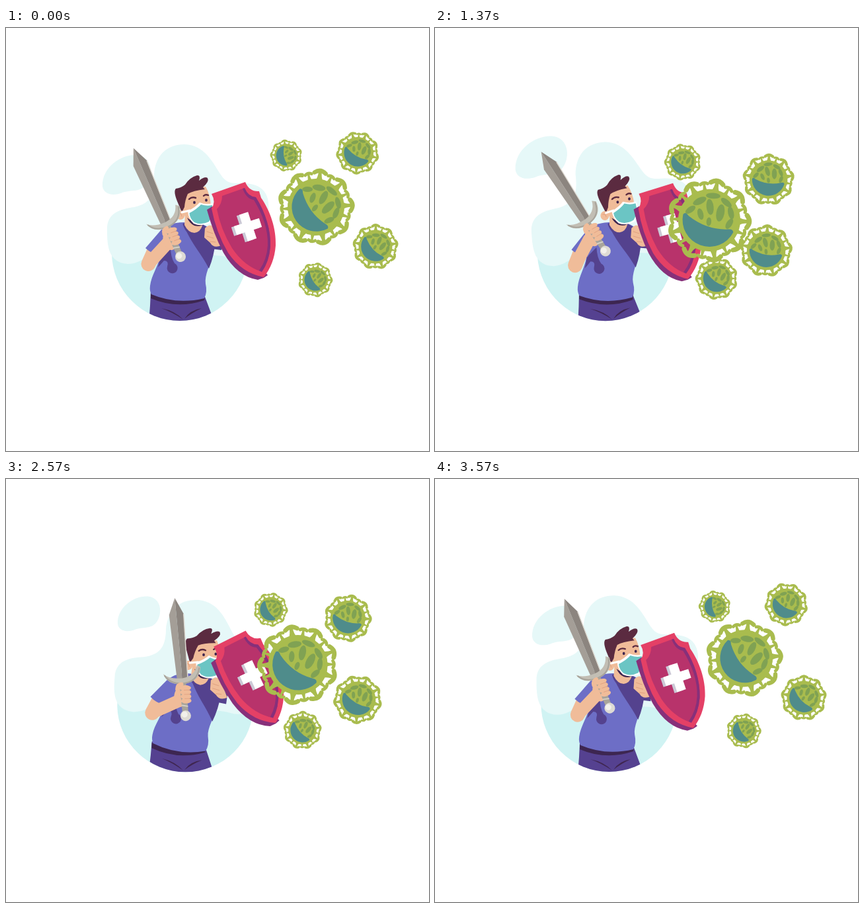
Animation of 640x640 px, one loop 3.61 s. Source, as an HTML page with a canvas:

```html
<!DOCTYPE html>
<html lang="en">
<head>
<meta charset="utf-8">
<title>Shield against viruses</title>
<style>
  html, body { margin: 0; width: 100%; height: 100%; overflow: hidden; background: #fff; }
  canvas { display: block; width: 100vw; height: 100vh; }
</style>
</head>
<body>
<canvas id="stage" width="640" height="640"></canvas>
<script>
const ctx = document.getElementById('stage').getContext('2d');
const LOOP = 3610;
const RAD = Math.PI / 180;

const COLOR = {
  mist: '#e6f8f8', water: '#d0f3f3',
  skin: '#f0bc99', skinShade: '#dfa080', hair: '#5b2b40', ink: '#3f2650',
  shirt: '#6d6ec6', shade: '#54428e', pants: '#554190', belt: '#3d2651',
  mask: '#6bc5c4', white: '#ffffff',
  rim: '#e44066', face: '#b8336b', side: '#87307a',
  green: '#a9bc4e', moss: '#80a253', teal: '#4f8c8b',
  steel: '#a49e97', steelDark: '#8c857f', guard: '#c2beb4', grip: '#a8a49b'
};

// Linear interpolation through [time, value] pairs.
function track(t, keys) {
  let i = 1;
  while (i < keys.length - 1 && t > keys[i][0]) i++;
  const [t0, v0] = keys[i - 1], [t1, v1] = keys[i];
  return v0 + (v1 - v0) * (t - t0) / (t1 - t0);
}

function at(x, y, degrees, draw, scale = 1) {
  ctx.save();
  ctx.translate(x, y);
  ctx.rotate(degrees * RAD);
  ctx.scale(scale, scale);
  draw();
  ctx.restore();
}

// Rotates drawing done in stage coordinates about a pivot.
function around(x, y, degrees, draw) {
  at(x, y, degrees, () => { ctx.translate(-x, -y); draw(); });
}

function rotated(x, y, cx, cy, degrees) {
  const c = Math.cos(degrees * RAD), s = Math.sin(degrees * RAD);
  return [cx + (x - cx) * c - (y - cy) * s, cy + (x - cx) * s + (y - cy) * c];
}

function fill(path, color) {
  ctx.fillStyle = color;
  ctx.fill(new Path2D(path));
}

function line(path, color, width) {
  ctx.strokeStyle = color;
  ctx.lineWidth = width;
  ctx.lineCap = ctx.lineJoin = 'round';
  ctx.stroke(new Path2D(path));
}

function oval(x, y, rx, ry, color, degrees = 0) {
  ctx.fillStyle = color;
  ctx.beginPath();
  ctx.ellipse(x, y, rx, ry, degrees * RAD, 0, Math.PI * 2);
  ctx.fill();
}

function backdrop(t, q) {
  around(263, 440, 5.5 * q, () => {
    ctx.translate(0, 440);
    ctx.scale(1, 1 - 0.024 * q);
    ctx.translate(0, -440);
    fill('M160 340 A103 103 0 0 0 366 340 Z', COLOR.water);
    fill('M153 306 C152 279 174 274 194 271 C221 265 226 250 224 222 C226 192 244 176 270 176 ' +
         'C301 177 313 204 325 222 C337 241 350 232 370 236 C397 240 402 266 394 290 ' +
         'C387 329 364 351 333 346 C302 340 282 350 250 335 C222 329 213 356 184 357 C155 355 153 330 153 306 Z',
         COLOR.mist);
  });
  const y = track(t, [[0, 222], [570, 216], [1850, 183.5], [2930, 214], [LOOP, 222]]);
  const size = 37 - 5 * q;
  at(183 + (q < 0 ? 40 : 21) * q, y, 0, () =>
    fill('M-37 17 C-38 -11 -9 -31 14 -30 C35 -29 41 -6 32 11 C22 29 6 21 -9 28 C-24 33 -36 28 -37 17 Z', COLOR.mist),
    size / 37);
}

function trousers(q, lean) {
  const [x, y] = rotated(263, 340, 263, 440, 5.5 * q);
  ctx.save();
  ctx.beginPath();
  ctx.arc(x, y, 103, 0, Math.PI * 2);
  ctx.clip();
  around(266, 440, lean * 0.6, () => {
    fill('M219 399 L300 404 L312 436 L320 460 L215 460 L218 420 Z', COLOR.pants);
    fill('M219 401 Q260 413 301 405 L300 412 Q259 426 219 409 Z', COLOR.belt);
    fill('M235 424 Q256 428 268 441 Q252 430 235 424 Z M296 424 Q278 427 270 440 Q281 431 296 424 Z', COLOR.ink);
  });
  ctx.restore();
}

function torso() {
  fill('M300 300 Q316 306 327 322 L326 336 L310 334 Z', COLOR.shade);
  fill('M269 294 C252 294 240 299 235 307 L213 333 Q220 343 233 346 C230 361 220 374 218 390 ' +
       'Q217 398 220 403 Q258 419 300 409 Q305 400 302 387 C300 374 309 358 313 342 L317 318 ' +
       'Q312 302 297 297 Z', COLOR.shirt);
  fill('M271 303 Q287 311 297 298 Q311 302 317 322 Q315 345 307 364 C296 342 281 327 271 303 Z', COLOR.shade);
  fill('M234 345 L249 331 Q249 347 255 356 A8 8 0 1 1 244 361 Q247 352 239 352 Q234 358 230 362 Z', COLOR.shade);
  line('M269 297 Q274 312 284 311 Q295 310 298 299', COLOR.shade, 3);
  fill('M271 282 L270 298 Q276 310 285 310 Q294 309 297 299 L294 286 Z', COLOR.skin);
}

function head() {
  fill('M267 252 Q270 243 302 240 Q309 251 310 270 L311 286 Q302 298 289 297 Q274 294 268 279 Z', COLOR.skin);
  fill('M274 287 Q286 297 303 294 Q295 302 285 299 Q278 296 274 287 Z', COLOR.ink);
  fill('M264 274 L259 262 Q253 247 257 243 Q265 242 271 237 Q278 226 289 223 Q295 222 292 231 ' +
       'Q301 224 305 227 Q308 232 298 241 L301 244 Q283 246 275 251 Q271 260 270 271 L266 279 Z', COLOR.hair);
  oval(264, 283, 6.5, 7, COLOR.skin);
  line('M261 281 Q265 279 266 285', COLOR.skinShade, 1);
  line('M266 279 L278 276', COLOR.white, 3);
  line('M277 259 Q281 255 287 257 M299 254 Q302 251 306 253', COLOR.hair, 2.4);
  oval(285, 264, 1.9, 2.2, COLOR.ink);
  oval(303, 260.5, 1.9, 2.2, COLOR.ink);
  fill('M275 277 Q287 271 293 264 Q303 268 313 265 Q317 282 309 295 Q295 301 284 296 Q276 289 275 277 Z', COLOR.white);
  fill('M277.5 280 Q289 274 295 267 Q304 270 312 268 Q315 282 307 293 Q295 299 285 294 Q278 288 277.5 280 Z', COLOR.mask);
}

function sword() {
  fill('M-5 -60 L5 -60 L4.5 -4 L-4.5 -4 Z', COLOR.grip);
  fill('M0 -179 L-11 -154 L-8 -56 L0 -56 Z', COLOR.steel);
  fill('M0 -179 L11 -154 L8 -56 L0 -56 Z', COLOR.steelDark);
  line('M11 -153 L8.4 -58', '#ded9d1', 1.4);
  fill('M-28 -66 Q-20 -57 0 -57 Q19 -58 24 -75 L29 -71 Q26 -49 1 -48 Q-23 -48 -28 -66 Z', COLOR.guard);
  line('M-26 -63 Q-19 -50 0 -49 Q22 -49 27 -70', COLOR.grip, 2);
  line('M-4 -16 L4 -14 M-4 -22 L4 -20', '#d4d0c8', 2);
  oval(0, 0, 8, 8, '#dedbd4');
  oval(-1.5, -2, 4.5, 4.5, '#f2f0eb');
}

function swordArm(q, lean) {
  const hand = [251.3 + 20 * q, 316.6 + 11 * q];
  const angle = -23.4 + (q < 0 ? 17.5 : 20.5) * q;
  const [sx, sy] = rotated(224, 338, 266, 440, lean);
  const [ex, ey] = rotated(215.5, 357, 266, 440, lean);
  const wrist = `${hand[0] - 7} ${hand[1] + 9}`;
  line(`M${sx} ${sy} L${ex} ${ey}`, COLOR.skin, 22);
  around(266, 440, lean, () => fill('M236 304 L211 333 Q219 341 235 345 L248 322 Z', COLOR.shirt));
  line(`M${ex} ${ey} L${wrist}`, COLOR.skin, 19);
  at(hand[0], hand[1], angle, () => {
    oval(-5, 3, 10, 15, COLOR.skin, 8);
    at(0, 32, 0, sword);
    for (let i = 0; i < 4; i++) {
      oval(3, -10 + i * 6.5, 9 - i * 0.4, 4.1, COLOR.skin, 5);
      if (i) line(`M1 ${-13.3 + i * 6.5} L10 ${-12.8 + i * 6.5}`, COLOR.skinShade, 0.8);
    }
    line('M-9 -9 Q-8 -16 -2 -16', COLOR.skin, 6);
  });
}

function shieldHand() {
  fill('M301 303 Q308 295 315 301 L326 329 Q314 334 309 325 L300 317 Z', COLOR.skin);
  line('M304 308 L313 311 M304 315 L314 318 M309 323 L317 324', COLOR.skinShade, 1);
}

function shield() {
  fill('M304 275 L312 270 L396 374 L390 378 L381 381 Q350 376 329 340 Q314 312 304 275 Z', COLOR.side);
  fill('M311 251 L362 233 Q368 248 383 247 L386 257 C400 277 409 304 408 329 Q406 357 390 377 ' +
       'Q357 371 336 340 Q318 310 311 273 Q318 263 311 251 Z', COLOR.rim);
  fill('M327 254 L361 242 Q366 255 378 256 C393 280 401 306 400 331 Q398 354 387 369 ' +
       'Q360 360 342 333 Q325 305 319 274 Q327 266 327 254 Z', COLOR.face);
  fill('M361 242 Q366 255 378 256 C393 280 401 306 400 331 Q398 354 387 369 L383 367 ' +
       'Q395 350 396 329 C397 306 389 283 375 260 Q364 259 358 243 Z', COLOR.side);
  const cross = 'M-7 -21 H7 V-7 H20 V7 H7 V21 H-7 V7 H-20 V-7 H-7 Z';
  at(362, 302, -18, () => fill(cross, '#cbc9d6'));
  at(366, 300.5, -18, () => fill(cross, COLOR.white));
}

const PATCHES = [
  [-4, -34, 10, 4, -12], [16, -30, 9, 4, 24], [-20, -22, 10, 4.6, -42], [-4, -18, 5, 11, -22],
  [12, -14, 5.6, 12, -5], [26, -18, 4, 9, -28], [-29, -7, 8, 4, -50], [-14, -5, 4, 8, -30],
  [28, -3, 4, 8, 16], [0, 2, 3.4, 6, -12]
];

// Large and small spikes alternate around the body.
function spikes() {
  for (let i = 0; i < 9; i++) {
    at(0, 0, i * 40 - 4, () => {
      fill('M-6 -40 Q-2.4 -45 -2.4 -54 H2.4 Q2.4 -45 6 -40 Z', COLOR.green);
      line('M-8.5 -52 Q0 -59 8.5 -52', COLOR.green, 6.4);
    });
    at(0, 0, i * 40 + 16, () => {
      fill('M-4 -40 Q-1.6 -44 -1.6 -51 H1.6 Q1.6 -44 4 -40 Z', COLOR.green);
      line('M-5 -50.5 Q0 -54 5 -50.5', COLOR.green, 4.6);
    });
  }
}

function virus() {
  spikes();
  oval(0, 0, 43, 43, COLOR.green);
  for (const [x, y, rx, ry, tilt] of PATCHES) oval(x, y, rx, ry, COLOR.moss, tilt);
  fill('M-37 2 Q-35 -3 -29 2 Q0 14 28 5 Q35 2 36.5 7 A37.2 37.2 0 0 1 -37 2 Z', COLOR.teal);
}

// Start, travel, radius, growth, crescent direction and its change, moment of closest approach.
const VIRUSES = [
  { x: 424, y: 193, dx: -50, dy: 10, r: 24.5, grow: 0.15, dir: 167, turn: -44, near: 1393 },
  { x: 532, y: 189, dx: -30, dy: 44, r: 33, grow: 0.22, dir: 118, turn: -25, near: 1500 },
  { x: 559, y: 331, dx: -58, dy: 6, r: 35, grow: 0.15, dir: 135, turn: -38, near: 1370 },
  { x: 468, y: 381, dx: -42, dy: -2, r: 26.5, grow: 0.23, dir: 145, turn: -21, near: 1370 },
  { x: 469, y: 271, dx: -57, dy: 21, r: 59, grow: 0.1, dir: 141, turn: -37, near: 1445 }
];

function render(t) {
  // Sway of the figure: -1 leaning back, +1 leaning forward.
  const q = track(t, [[0, 0], [985, -1], [2670, 1], [LOOP, 0]]);
  const lean = 4.5 * q;
  ctx.setTransform(1, 0, 0, 1, 0, 0);
  ctx.fillStyle = COLOR.white;
  ctx.fillRect(0, 0, 640, 640);

  backdrop(t, q);
  trousers(q, lean);
  around(266, 440, lean, () => {
    torso();
    around(285, 295, 4 * q, head);
  });
  at((q < 0 ? 7 : 10) * q, (q < 0 ? 0 : 2) * q, 0, shieldHand);
  swordArm(q, lean);
  at((q < 0 ? 4 : 1.7) * q, -2.3 * q, 0, () => around(350, 240, (q < 0 ? -4 : -8) * q, shield));

  for (const v of VIRUSES) {
    const u = track(t, [[0, 0], [v.near, 1], [LOOP, 0]]);
    at(v.x + v.dx * u, v.y + v.dy * u, v.dir + v.turn * u - 90, virus, v.r / 59 * (1 + v.grow * u));
  }
}

function tick() {
  render(performance.now() % LOOP);
  requestAnimationFrame(tick);
}
tick();
</script>
</body>
</html>
```
